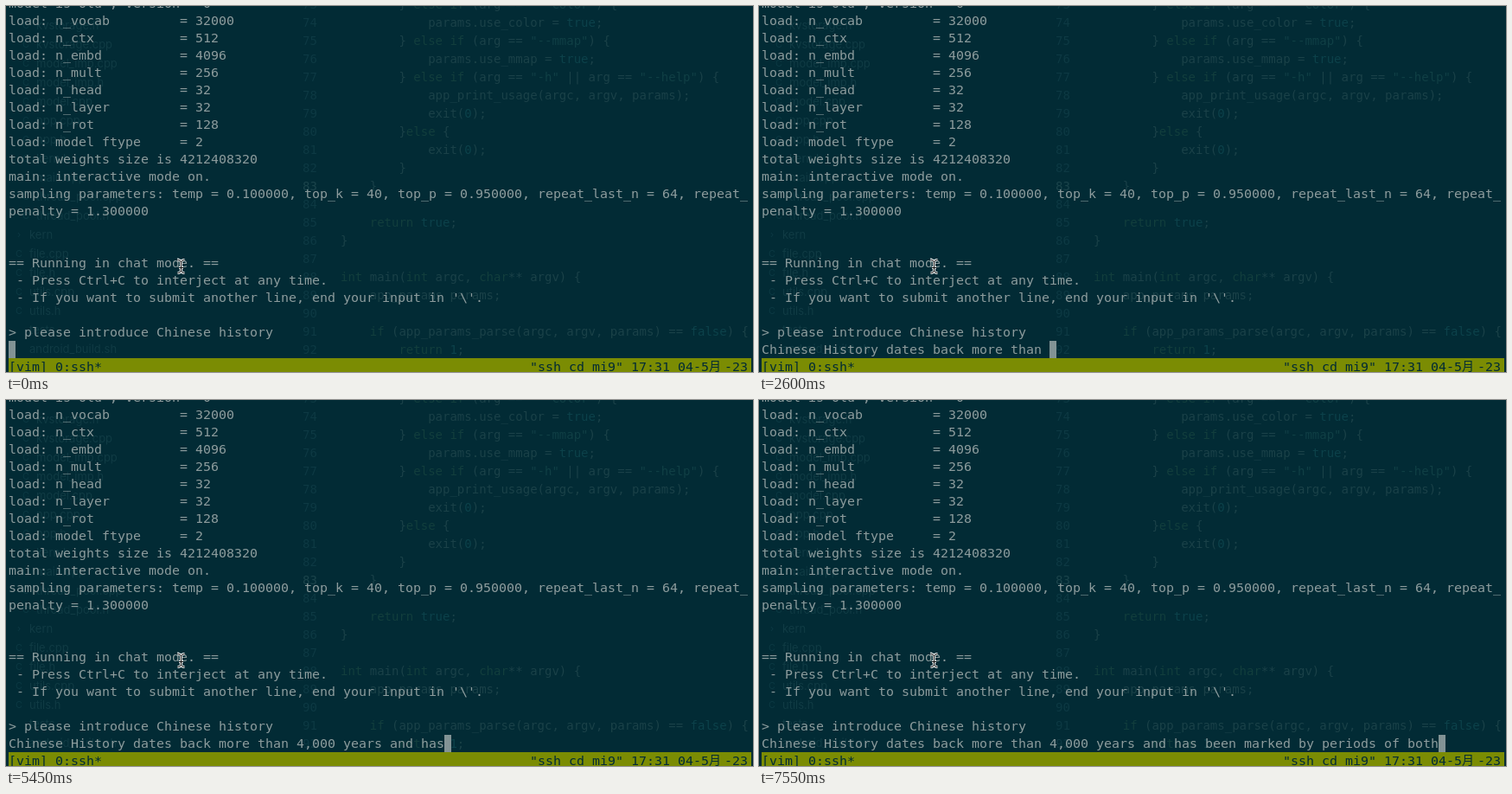
An HTML page with a canvas for the animation above (8000 ms loop, 864 by 423 pixels).

```html
<!DOCTYPE html>
<html lang="en">
<head>
<meta charset="utf-8">
<title>Terminal chat</title>
<style>
html, body { margin: 0; width: 100%; height: 100%; overflow: hidden; background: #022b35; }
canvas { display: block; }
</style>
</head>
<body>
<canvas id="stage" width="864" height="423"></canvas>
<script>
const ctx = document.getElementById('stage').getContext('2d');
const MONO = '"DejaVu Sans Mono", monospace';
const UI = 'Inter, sans-serif';
const LOOP = 8000, CELL = 9, LEFT = 3;
const BG = '#022b35', TEXT = '#8d9c9d', CURSOR = '#829395', BAR = '#7b8c03';

const param = (name, value) => ('load: ' + name).padEnd(22) + '= ' + value;
const lines = [
  'model is old , version = 0',
  param('n_vocab', 32000),
  param('n_ctx', 512),
  param('n_embd', 4096),
  param('n_mult', 256),
  param('n_head', 32),
  param('n_layer', 32),
  param('n_rot', 128),
  param('model ftype', 2),
  'total weights size is 4212408320',
  'main: interactive mode on.',
  'sampling parameters: temp = 0.100000, top_k = 40, top_p = 0.950000, repeat_last_n = 64, repeat_',
  'penalty = 1.300000',
  '', '',
  '== Running in chat mode. ==',
  ' - Press Ctrl+C to interject at any time.',
  " - If you want to submit another line, end your input in '\\'.",
  '',
  '> please introduce Chinese history'
];

const tokens = [
  [500, 'Chinese'], [800, ' History'], [1100, ' dates'], [1400, ' back'],
  [1850, ' more'], [2150, ' than'], [2600, ' '], [2900, '4'], [3200, ','],
  [3650, '0'], [3950, '0'], [4250, '0'], [4700, ' years'], [5000, ' and'],
  [5450, ' has'], [5750, ' been'], [6050, ' marked'], [6500, ' by'],
  [6800, ' periods'], [7250, ' of'], [7550, ' both']
];

// Editor showing faintly through the terminal, starting at line 73.
const code = [
  '        } else if (arg == "--color") {',
  '            params.use_color = true;',
  '        } else if (arg == "--mmap") {',
  '            params.use_mmap = true;',
  '        } else if (arg == "-h" || arg == "--help") {',
  '            app_print_usage(argc, argv, params);',
  '            exit(0);',
  '        }else {',
  '            exit(0);',
  '        }',
  '    }',
  '',
  '    return true;',
  '}',
  '',
  'int main(int argc, char** argv) {',
  '    app_params params;',
  '',
  '    if (app_params_parse(argc, argv, params) == false) {',
  '        return 1;'
];

const files = [
  'kvstorage.h', 'kvstorage.cpp', 'model_imp.cpp', 'model_imp.h', 'model.cpp', 'npp.cpp',
  'npp.h', 'kern.h', 'main.cpp', 'thread_pool.cpp', 'thread_pool.h', 'kern', 'file.cpp',
  'file.h', 'utils.cpp', 'utils.h', 'tests', 'android_build.sh'
];

function put(str, x, y, color, step = CELL, size = 14.95) {
  ctx.font = `${size}px ${MONO}`;
  ctx.fillStyle = color;
  [...str].forEach((ch, i) => {
    if (ch !== ' ') ctx.fillText(ch, x + i * step, y);
  });
}

function drawCode() {
  const step = 8.428;
  const words = /"[^"]*"|\b(?:else|if|return|int|char|true|false)\b|\w+|\W/g;
  code.forEach((line, i) => {
    const y = 3 + i * 21;
    put(String(73 + i), 343, y, i === 10 ? '#1b444b' : '#0d3943', step, 14);
    for (const m of line.matchAll(words)) {
      const word = m[0];
      let color = '#1a4148';
      if (word[0] === '"') color = '#103f45';
      else if (/^(else|if|return|int|char)$/.test(word)) color = '#123e3d';
      else if (/^(true|false|\d+)$/.test(word)) color = '#0c414a';
      put(word, 387 + m.index * step, y, color, step, 14);
    }
  });
}

function drawFiles() {
  files.forEach((name, i) => {
    const y = 27 + i * 22;
    const x = i < 11 ? 35 : 27;
    ctx.font = `13px ${UI}`;
    ctx.fillStyle = '#103b44';
    ctx.fillText(name, x, y);
    ctx.fillStyle = '#0c3943';
    ctx.font = `11px ${UI}`;
    if (name === 'kern') ctx.fillText('›', x - 14, y - 1);
    else if (/\.(cpp|h)$/.test(name)) ctx.fillText('C', x - 16, y - 1);
  });
}

function drawPointer() {
  const p = new Path2D('M198.5 293.5 Q202 293.5 202.5 296 Q203 293.5 206.5 293.5' +
    ' M202.5 296 V306 M198.5 308.5 Q202 308.5 202.5 306 Q203 308.5 206.5 308.5 M200 302.5 H205');
  ctx.strokeStyle = '#f2f4f4';
  ctx.lineWidth = 3;
  ctx.stroke(p);
  ctx.strokeStyle = '#101010';
  ctx.lineWidth = 1;
  ctx.stroke(p);
}

function drawStatus() {
  ctx.fillStyle = BAR;
  ctx.fillRect(LEFT, 407, 859, 16);
  put('[vim] 0:ssh*', LEFT, 422, BG);
  put('"ssh cd mi9" 17:31 04-5', 606, 422, BG);
  ctx.font = '14px "Noto Sans CJK SC", "Noto Sans CJK JP", sans-serif';
  ctx.fillText('月', 813, 421);
  put('-23', 831, 422, BG);
}

function draw(t) {
  ctx.fillStyle = BG;
  ctx.fillRect(0, 0, 864, 423);
  drawFiles();
  drawCode();
  lines.forEach((line, i) => put(line, LEFT, 2 + i * 20, TEXT));
  const reply = tokens.filter(([at]) => t >= at).map(([, s]) => s).join('');
  put(reply, LEFT, 402, TEXT);
  ctx.fillStyle = CURSOR;
  ctx.fillRect(LEFT + reply.length * CELL, 387, 8, 20);
  drawStatus();
  drawPointer();
}

const start = performance.now();
function tick() {
  draw((performance.now() - start) % LOOP);
  requestAnimationFrame(tick);
}
tick();
</script>
</body>
</html>
```
